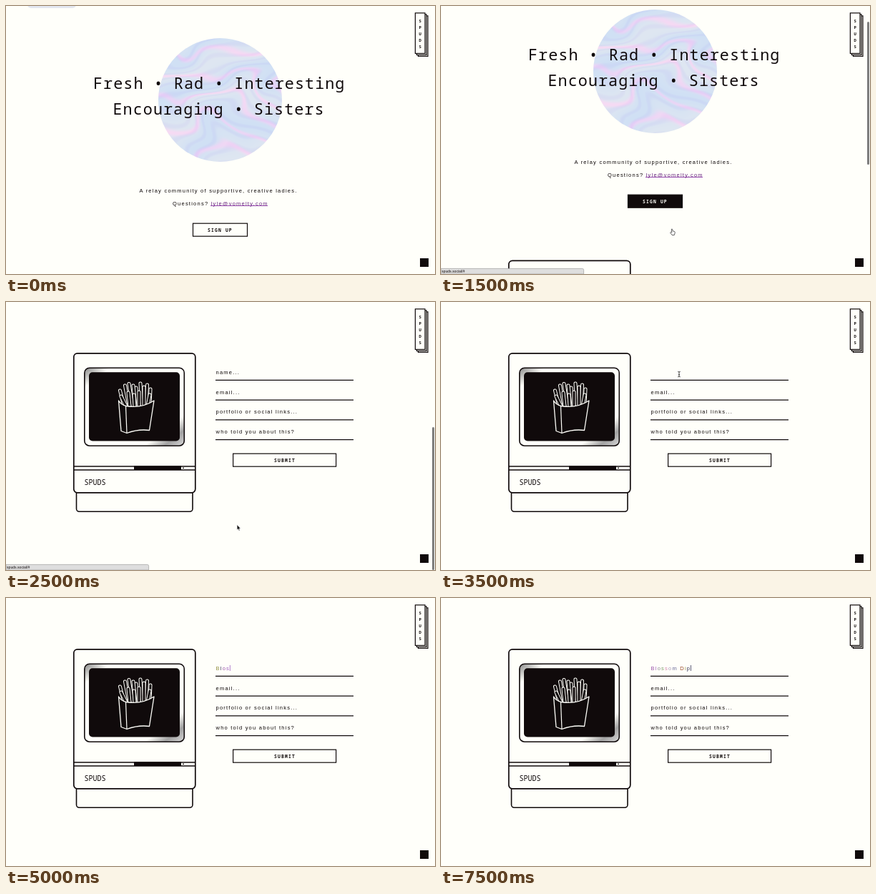
An HTML page with a canvas for the animation above (8 s loop, 600 by 375 pixels).

```html
<!DOCTYPE html>
<html lang="en">
<head>
<meta charset="utf-8">
<title>Sign up</title>
<style>
  html, body { margin: 0; width: 100%; height: 100%; overflow: hidden; background: #fffffa; }
  canvas { position: absolute; left: 213px; top: 45px; width: 173px; height: 173px; border-radius: 50%; }
  svg { position: absolute; left: 0; top: 0; width: 600px; height: 375px; overflow: hidden; }
  text { white-space: pre; fill: #100a0b; }
  .sans { font: 7.5px "Liberation Sans", Arial, sans-serif; letter-spacing: 1.235px; }
  .mono { font-family: "Noto Sans Mono", "DejaVu Sans Mono", monospace; }
  .title { font-size: 21.8px; font-weight: 500; letter-spacing: 1.02px; }
  .btn { font-size: 6.3px; font-weight: 700; letter-spacing: 1.2px; }
  .tag { font-size: 5.6px; font-weight: 700; text-anchor: middle; }
  .ink { fill: none; stroke: #100a0b; stroke-width: 1.6; }
  .paper { fill: #fffffa; stroke: #100a0b; stroke-width: 1.2; }
  .dark { fill: #100a0b; }
</style>
</head>
<body>
<canvas id="marble" width="173" height="173"></canvas>
<svg viewBox="0 0 600 375">
  <defs>
    <linearGradient id="bezel" x1="0" y1="0" x2="1" y2="1">
      <stop offset="0" stop-color="#858585"/>
      <stop offset=".13" stop-color="#fffffa"/>
      <stop offset=".8" stop-color="#fffffa"/>
      <stop offset=".9" stop-color="#a2a2a2"/>
      <stop offset="1" stop-color="#d8d8d8"/>
    </linearGradient>
  </defs>

  <rect id="blob" x="30" y="-7" width="68" height="10" rx="5" fill="#e3e7f0"/>

  <g id="page">
    <text class="mono title" x="122" y="115.5">Fresh • Rad • Interesting</text>
    <text class="mono title" x="149.5" y="151.7">Encouraging • Sisters</text>
    <text class="sans" x="186.5" y="260.5">A relay community of supportive, creative ladies.</text>
    <text class="sans" x="233" y="278.5">Questions? <tspan style="fill:#6a2a80">lyle@vomelty.com</tspan></text>
    <rect x="286" y="279" width="80" height=".9" fill="#8a35a5"/>
    <rect id="signBox" class="paper" x="261.5" y="304.2" width="76" height="18"/>
    <text id="signText" class="mono btn" x="282" y="315.6">SIGN UP</text>

    <g transform="translate(0 324.5)">
      <rect class="ink" x="98.5" y="260" width="162.5" height="33.3" rx="4"/>
      <rect class="paper" style="stroke-width:1.7" x="94.8" y="71.8" width="170" height="195" rx="5"/>
      <path class="ink" d="M95 230H265M95 235H265"/>
      <rect class="dark" x="179" y="229.5" width="66" height="5.5"/>
      <rect class="dark" x="247" y="231.7" width="2" height="1.2"/>
      <rect class="ink" style="fill:url(#bezel)" x="109.8" y="92.2" width="139.5" height="109" rx="7"/>
      <rect class="dark" x="116" y="98.3" width="127" height="96.2" rx="5"/>
      <g id="snack"></g>
      <path d="M157.5 138Q161 144 168 145.5Q190 149 207 138L200.5 179.5Q185 177.5 169 183.5L161 180.5Z"
        fill="#100a0b" stroke="#fffffa" stroke-width="1.3" stroke-linejoin="round"/>
      <path d="M167.5 145.5L169 183.5" stroke="#fffffa" stroke-width="1.2"/>
      <text class="mono" x="109.5" y="255.5" font-size="10">SPUDS</text>

      <g id="fields"></g>
      <text id="typed" class="sans" x="293.5" y="101"></text>
      <rect id="caret" y="94" width=".8" height="8"/>
      <rect class="paper" x="317.6" y="212.2" width="144" height="18"/>
      <text class="mono btn" x="375" y="223.8">SUBMIT</text>
    </g>
  </g>

  <g id="tag"></g>
  <rect class="dark" x="579" y="353" width="12" height="12"/>
  <rect id="bar" x="596" width="3" height="200" rx="1.5" fill="#7d7d7d"/>
  <g id="status">
    <path d="M0 367.4H197.5Q199.6 367.4 199.6 369.5V375H0Z" fill="#dedede" stroke="#a8a8a8" stroke-width=".8"/>
    <text x="1" y="373.3" style="font:5.1px 'Liberation Sans',Arial,sans-serif">spuds.social/#</text>
  </g>

  <g id="hand" transform="translate(320.5 311.5)">
    <path d="M1.8 .8Q2.6 0 3.2 1L3.8 3.4L6.3 4.2Q7 4.6 6.6 6.4L5.8 9H2.6L.4 6Q0 5 1 4.8L2.4 5.4Z"
      fill="#fff" stroke="#222" stroke-width=".7"/>
  </g>
  <path id="arrow" d="M323.2 311.8V318.8L324.8 317.4L325.9 319.9L327 319.4L325.9 317H328Z"
    fill="#111" stroke="#fff" stroke-width=".4"/>
  <path id="beam" d="M331.2 97.3Q333 97.3 333 98.4Q333 97.3 334.8 97.3M333 98.2V104M331.2 104.8Q333 104.8 333 103.8Q333 104.8 334.8 104.8M332 101.6H334"
    fill="none" stroke="#222" stroke-width=".8"/>
</svg>

<script>
const $ = id => document.getElementById(id);
const NS = "http://www.w3.org/2000/svg";

function add(parent, tag, attrs, text) {
  const el = document.createElementNS(NS, tag);
  for (const k in attrs) el.setAttribute(k, attrs[k]);
  if (text) el.textContent = text;
  parent.append(el);
  return el;
}

// Pastel marble: warped sine bands
function paintMarble() {
  const size = 173, ctx = $("marble").getContext("2d");
  const img = ctx.createImageData(size, size);
  const { sin, max } = Math;
  for (let j = 0; j < size; j++) for (let i = 0; i < size; i++) {
    const x = i / 86 - 1, y = j / 86 - 1;
    const a = x + 0.3 * sin(3.1 * y + 1) + 0.12 * sin(7 * y - 4 * x);
    const b = y - 0.25 * x + 0.32 * sin(2.4 * a + 0.6) + 0.1 * sin(6 * a + 3 * y);
    const blue = 0.5 + 0.5 * sin(7 * b + 2 * a);
    const fine = max(0, sin(34 * b + 5 * a));
    const pink = max(0, sin(15 * b - 3 * a)) ** 4;
    const p = (j * size + i) * 4;
    img.data[p] = 208 + 14 * blue + 24 * pink - 5 * fine;
    img.data[p + 1] = 224 + 6 * blue - 12 * pink - 8 * fine;
    img.data[p + 2] = 244 - 3 * blue + 2 * pink;
    img.data[p + 3] = 255;
  }
  ctx.putImageData(img, 0, 0);
}

// Each stick: base x, tip x, tip y
const sticks = [
  [165, 159.5, 124], [184, 182, 120], [201, 202, 122], [172, 166.5, 117], [196, 197.5, 116],
  [177, 172, 114.5], [190, 188, 114], [168, 161, 132], [181, 178, 117], [193, 193, 119],
  [173, 171, 127], [186, 186, 126], [198, 201, 130], [180, 179, 130]
];
for (const [x, tx, ty] of sticks)
  for (const [w, c] of [[5, "#fffffa"], [3, "#100a0b"]])
    add($("snack"), "path", { d: `M${x} 146L${tx} ${ty}`, stroke: c, "stroke-width": w, "stroke-linecap": "round" });

const labels = ["name...", "email...", "portfolio or social links...", "who told you about this?"];
const hints = labels.map((s, i) => {
  add($("fields"), "path", { d: `M293 ${109.3 + 27.75 * i}H486`, class: "ink", style: "stroke-width:1.3" });
  return add($("fields"), "text", { class: "sans", x: 293.5, y: 101 + 27.7 * i }, s);
});

for (const d of [4, 2, 0])
  add($("tag"), "rect", { class: "paper", x: 572.4 + d, y: 9.8 + d, width: 13.6, height: 56.6 });
[..."SPUDS"].forEach((c, i) =>
  add($("tag"), "text", { class: "mono tag", x: 579.2, y: 23.3 + 8.85 * i }, c));

const phrase = "Blossom Dip";
const tints = ["#93913f", "#3a3a5a", "#9a55a8", "#a060c0", "#8a8a90", "#7fa06a",
  "#d58ab0", "#a89ab8", "#6a6a98", "#888888", "#9a4a28"];

// start ms, scroll, pointer, scrollbar y, letters typed (-1 = field idle)
const steps = [
  [0, 0, "", null, -1],
  [1000, 0, "hand", null, -1],
  [1500, 40, "hand", 22, -1],
  [2000, 199.5, "hand", 108, -1],
  [2500, 324.5, "arrow", 175, -1],
  [3000, 324.5, "beam", null, -1],
  [3500, 324.5, "beam", null, 0],
  [4000, 324.5, "", null, 1],
  [4500, 324.5, "", null, 3],
  [5000, 324.5, "", null, 4],
  [5500, 324.5, "", null, 6],
  [6000, 324.5, "", null, 7],
  [6500, 324.5, "", null, 8],
  [7000, 324.5, "", null, 9],
  [7500, 324.5, "", null, 11]
];

const show = (el, on) => { el.style.display = on ? "" : "none"; };

function typeText(n) {
  const tint = i => tints[(i + 5 * (n + 7)) % 11];
  $("typed").replaceChildren();
  for (let i = 0; i < n; i++) add($("typed"), "tspan", { style: `fill:${tint(i)}` }, phrase[i]);
  show(hints[0], n < 0);
  show($("caret"), n > 0);
  if (n > 0) {
    $("caret").setAttribute("x", 293.3 + $("typed").getComputedTextLength());
    $("caret").setAttribute("fill", tint(n - 1));
  }
}

function render([start, scroll, pointer, bar, typed]) {
  const hover = start >= 1000;
  $("page").setAttribute("transform", `translate(0 ${-scroll})`);
  $("marble").style.transform = `translateY(${-scroll}px)`;
  $("signBox").style.fill = hover ? "#100a0b" : "";
  $("signText").style.fill = hover ? "#fffffa" : "";
  show($("blob"), !hover);
  show($("status"), hover && start < 3000);
  for (const id of ["hand", "arrow", "beam"]) show($(id), id === pointer);
  show($("bar"), bar !== null);
  if (bar !== null) $("bar").setAttribute("y", bar);
  typeText(typed);
}

paintMarble();
const t0 = performance.now();
let current = null;
function tick() {
  const t = (performance.now() - t0) % 8000;
  const step = steps.findLast(s => s[0] <= t);
  if (step !== current) render(current = step);
  requestAnimationFrame(tick);
}
tick();
</script>
</body>
</html>
```
